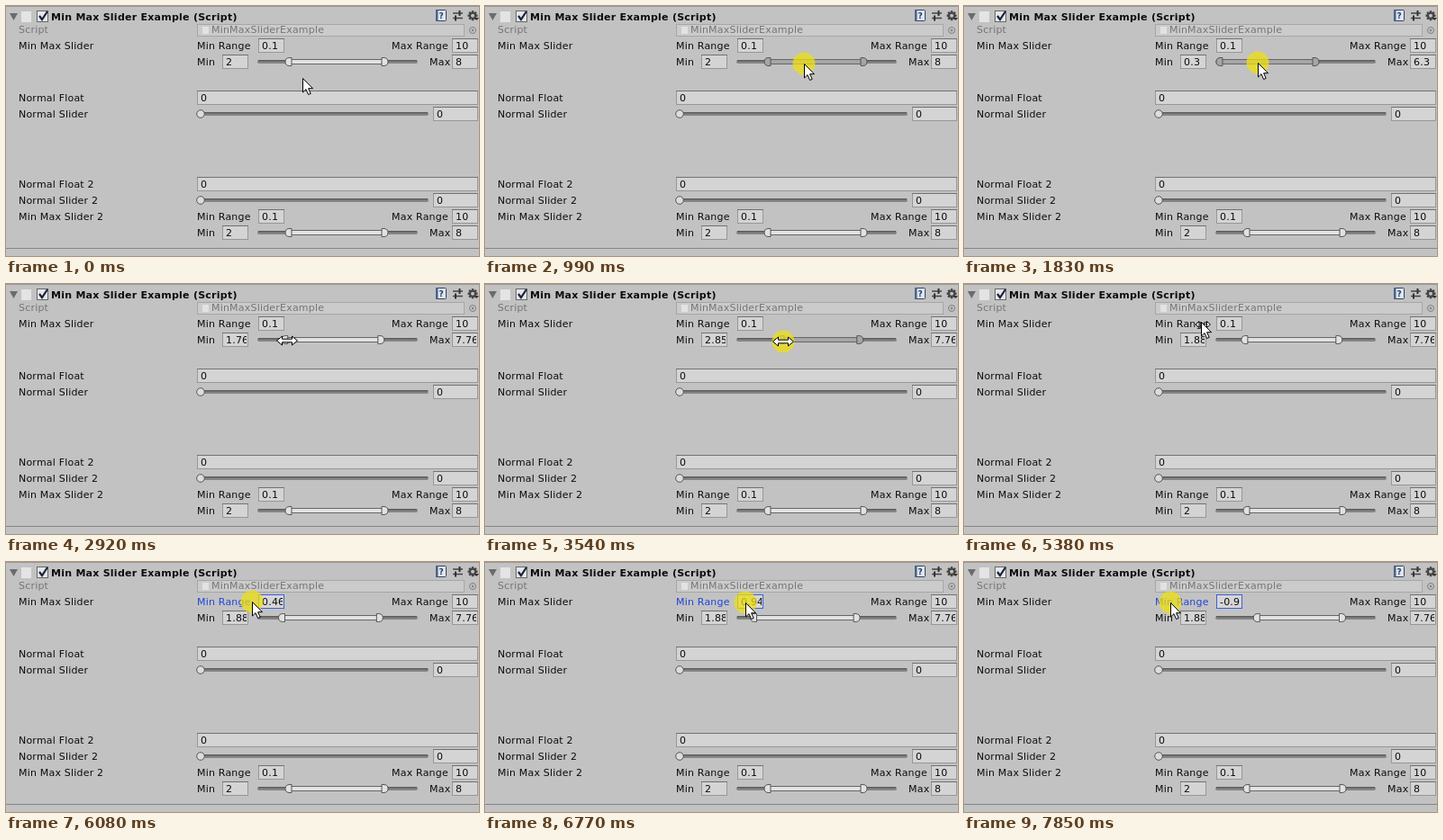
These frames come from a looping animation (525 by 278 pixels, 8 s). An HTML page:

```html
<!DOCTYPE html>
<html lang="en">
<head>
<meta charset="utf-8">
<title>Min Max Slider</title>
<style>
  html, body { margin: 0; height: 100%; overflow: hidden; background: #c2c2c2; }
  svg { display: block; }
  #stage { width: 100vw; height: 100vh; }
  text { font: 11px "DejaVu Sans", sans-serif; letter-spacing: .2px; white-space: pre; fill: #0c0c0c; }
  .title { font-weight: bold; letter-spacing: .25px; }
  .dim { fill: #757575; }
  .active { fill: #1f45dc; }
</style>
</head>
<body>
<svg id="stage" viewBox="0 0 525 278">
  <g id="fixed"></g>
  <g id="live"></g>
</svg>
<script>
const LOOP = 8000, STEP = 77.17, FIRST = 210;

// Moves: start, end, then the values reached; everything rests in between
const POINTER = [
  [0, 0, 329, 80],
  [133, 440, 343, 67],
  [520, 590, 346, 66],
  [680, 1060, 356, 63],
  [1145, 1520, 323, 63],
  [1755, 1828, 326, 63],
  [1828, 2230, 352, 63],
  [2230, 2600, 317, 62],
  [2690, 2910, 312, 63],
  [3225, 3680, 341, 64],
  [4070, 4375, 326, 66],
  [4375, 4840, 312, 65],
  [4920, 5070, 298, 53],
  [5070, 5380, 263, 42],
  [5380, 5450, 257, 42],
  [5450, 5610, 261, 43],
  [5690, 6530, 287, 45],
  [6610, 6765, 289, 45],
  [6920, 7765, 229, 45]
];
const LOW = [
  [0, 0, 2], [1145, 1520, .1], [1755, 1828, .29], [1828, 2230, 1.76],
  [3225, 3680, 3.4], [4070, 4375, 2.76], [4375, 4840, 1.88]
];
const FLOOR = [
  [0, 0, .1], [5690, 6530, .88], [6610, 6765, .94], [6920, 7765, -.9], [7765, 7845, -.92]
];

const $ = id => document.getElementById(id);
const within = (t, a, b) => t >= a && t < b;
const show = v => String(+v.toFixed(2));

const text = (x, y, s, cls = "") => `<text x="${x}" y="${y}" class="${cls}">${s}</text>`;
const rect = (x, y, w, h, fill, more = "") =>
  `<rect x="${x}" y="${y}" width="${w}" height="${h}" fill="${fill}" ${more}/>`;
const path = (d, fill = "none", stroke = "none", more = "") =>
  `<path d="${d}" fill="${fill}" stroke="${stroke}" ${more}/>`;

// Input box, y is the centre of its row; the inner svg clips long values
function field(x, y, w, value, focus) {
  const top = y - 8;
  const edge = focus
    ? rect(x + .5, top + .5, w - 1, 15, "#d6d6d6", 'stroke="#3c62d8"')
    : rect(x, top, w, 16, "#979797") + rect(x, top, w, 1, "#727272") +
      rect(x + 1, top + 1, w - 2, 14, "#d4d4d4");
  return edge + `<svg x="${x + 2}" y="${top}" width="${w - 4}" height="16">${text(2, 12, value)}</svg>`;
}

const track = (x, y, w) =>
  rect(x, y - 2, w, 4, "#858585", 'rx="2"') + rect(x + 1, y - 2, w - 2, 1.5, "#5c5c5c");

function slider(y) {
  return track(213, y, 256) +
    `<circle cx="216" cy="${y}" r="4.3" fill="#dcdcdc" stroke="#555"/>` + field(474, y, 50, "0");
}

function minMax(y, low, high, floor, pressed, focus) {
  const at = v => 280.4 + (v - floor) / (10 - floor) * 175;
  const a = at(low), b = at(high);
  const fill = pressed ? "#a6a6a6" : "#e2e2e2";
  const cap = (x, s) => path(
    `M${x + 3 * s} ${y - 4.5}h${-2 * s}q${-5 * s} 0 ${-5 * s} 4.5t${5 * s} 4.5h${2 * s}z`, fill, "#555");
  return text(212, y - 14, "Min Range", focus ? "active" : "") +
    field(280, y - 18, 29, show(floor), focus) +
    text(428, y - 14, "Max Range") + field(495, y - 18, 29, "10") +
    text(212, y + 4, "Min") + field(240, y, 29, show(low)) +
    text(470, y + 4, "Max") + field(495, y, 29, show(high)) +
    track(279, y, 178) +
    rect(a, y - 2.5, b - a, 5, fill, 'stroke="#666"') + cap(a, 1) + cap(b, -1);
}

function pointer(x, y, kind) {
  let d;
  if (kind === "resize") {
    d = path("M-11.5 0l6-5v3.2h11v-3.2l6 5l-6 5v-3.2h-11v3.2z", "#fff", "#000");
  } else {
    d = path("M.5 .5v15.5l3.5-3.4l2.6 5.9l2.6-1.1l-2.6-5.7h4.9z", "#fff", "#000");
    if (kind === "slide") d = path("M-2 -.5l-4 3.5l4 3.5zM6.5 -.5l4 3.5l-4 3.5z", "#fff", "#000") + d;
  }
  return `<g transform="translate(${x} ${y})">${d}</g>`;
}

function header() {
  const teeth = [0, 45, 90, 135].map(r =>
    rect(512.5, 9.5, 11, 2.4, "#444", `transform="rotate(${r} 518 10.7)"`)).join("");
  return rect(0, 0, 525, 1, "#9a9a9a") +
    path("M4 8h9l-4.5 8z", "#6b6b6b") +
    rect(17, 6, 11, 12, "#e4e4e4") +
    rect(34.5, 5.5, 12, 12, "#e6e6e6", 'stroke="#666"') +
    path("M37 11l3 4l6-9", "none", "#16233f", 'stroke-width="2.2"') +
    text(50, 16, "Min Max Slider Example (Script)", "title") +
    rect(477.5, 4.5, 11, 12, "#dfe5ee", 'rx="1" stroke="#34445f"') +
    rect(477, 4, 2.5, 13, "#4b6287") +
    `<text x="480.5" y="14" style="font-size:9px;font-weight:bold;fill:#27406c">?</text>` +
    path("M496 8h11M496 13.5h11", "none", "#444", 'stroke-width="1.5"') +
    path("M503.5 5v6M499 10.5v6", "none", "#333", 'stroke-width="2"') +
    teeth + `<circle cx="518" cy="10.7" r="3" fill="#c2c2c2" stroke="#444" stroke-width="2"/>` +
    path("M520 13h5l-2.5 3z", "#333");
}

function scriptRow() {
  return text(14, 30, "Script", "dim") +
    rect(212.5, 20.5, 296, 13, "#cbcbcb", 'stroke="#a6a6a6"') +
    rect(218, 23, 7, 8, "#e2e2e2") +
    text(228, 30, "MinMaxSliderExample", "dim") +
    `<circle cx="518" cy="27" r="3.5" fill="none" stroke="#808080"/>` +
    `<circle cx="518" cy="27" r="1.2" fill="#808080"/>`;
}

const labels = [
  [44, "Min Max Slider"], [102, "Normal Float"], [120, "Normal Slider"],
  [198, "Normal Float 2"], [216, "Normal Slider 2"], [234, "Min Max Slider 2"]
];

$("fixed").innerHTML = rect(0, 0, 525, 278, "#c2c2c2") + header() + scriptRow() +
  labels.map(([y, s]) => text(14, y + 4, s)).join("") +
  field(212, 102, 312, "0") + slider(120) +
  field(212, 198, 312, "0") + slider(216) +
  minMax(252, 2, 8, .1) +
  rect(0, 269, 525, 1, "#858585");

function follow(moves, t) {
  let now = moves[0].slice(2);
  for (const [start, end, ...goal] of moves.slice(1)) {
    if (t <= start) break;
    const p = Math.min(1, (t - start) / (end - start));
    now = now.map((v, i) => v + (goal[i] - v) * p);
  }
  return now;
}

function draw(t) {
  const [x, y] = follow(POINTER, t).map(Math.round);
  const [low] = follow(LOW, t), [floor] = follow(FLOOR, t);
  const high = t < 2500 ? low + 6 : 7.76;
  const onBar = within(t, 900, 2260) || within(t, 3140, 4900);
  const onLabel = t >= 5760;
  const kind = within(t, 2830, 5050) ? "resize" : within(t, 5280, 5760) ? "slide" : "arrow";
  const glow = onBar || onLabel
    ? `<circle cx="${x}" cy="${y}" r="12.5" fill="#ecdf12" opacity=".75"/>` : "";
  $("live").innerHTML = minMax(62, low, high, floor, onBar, onLabel) + glow + pointer(x, y, kind);
}

let last;
function tick() {
  const t = performance.now() % LOOP;
  const n = Math.max(-1, Math.floor((t - FIRST + 4) / STEP));
  if (n !== last) draw(FIRST + n * STEP);
  last = n;
  requestAnimationFrame(tick);
}
tick();
</script>
</body>
</html>
```
